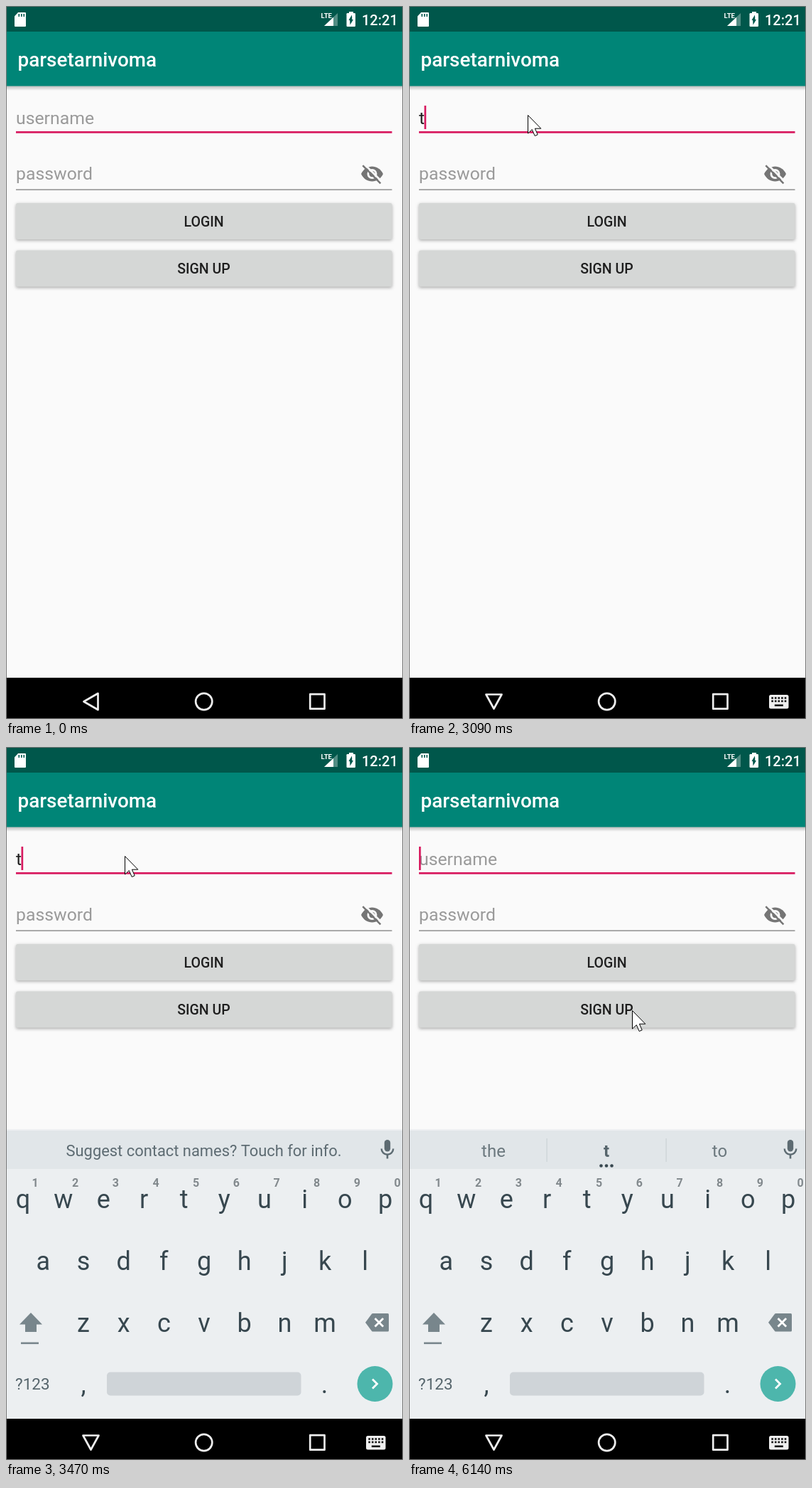
These frames come from a looping animation (559x1002 px, 8 s). An HTML page with a canvas:

```html
<!DOCTYPE html>
<html lang="en">
<head>
<meta charset="utf-8">
<title>Login screen</title>
<style>
  html, body { margin: 0; width: 100%; height: 100%; overflow: hidden; background: #fafafa; }
  canvas { display: block; }
</style>
</head>
<body>
<canvas id="stage" width="559" height="1002"></canvas>
<script>
const W = 559, H = 1002, LOOP = 8000, STEP = 90;
const TYPE = 3090, SLIDE = 3270, ERASE = 3790;
const ctx = document.getElementById('stage').getContext('2d');
const INK = '#37474f', SOFT = '#78868c', GREY = '#757575';

const within = (t, a, b) => t >= a && t < b;
const smooth = u => u * u * (3 - 2 * u);

// Progress from a to b, advancing once per screen capture
function progress(t, a, b) {
  if (t >= b) return 1;
  return Math.max(0, Math.floor((t - a) / STEP) * STEP / (b - a));
}

function box(x, y, w, h, color, r = 0) {
  ctx.fillStyle = color;
  ctx.beginPath();
  ctx.roundRect(x, y, w, h, r);
  ctx.fill();
}

function frame(x, y, w, h, color, width) {
  ctx.strokeStyle = color;
  ctx.lineWidth = width;
  ctx.strokeRect(x, y, w, h);
}

function disc(x, y, r, color) {
  ctx.fillStyle = color;
  ctx.beginPath();
  ctx.arc(x, y, r, 0, Math.PI * 2);
  ctx.fill();
}

function ring(x, y, r, color, width, end = Math.PI * 2) {
  ctx.strokeStyle = color;
  ctx.lineWidth = width;
  ctx.beginPath();
  ctx.arc(x, y, r, 0, end);
  ctx.stroke();
}

function path(points, closed) {
  ctx.beginPath();
  points.forEach(p => ctx.lineTo(...p));
  if (closed) ctx.closePath();
}

function poly(points, color) {
  path(points, true);
  ctx.fillStyle = color;
  ctx.fill();
}

function line(points, color, width, closed = false) {
  path(points, closed);
  ctx.strokeStyle = color;
  ctx.lineWidth = width;
  ctx.stroke();
}

// Isosceles triangle: apex at the origin side, opening along +x before turning
function wedge(x, y, depth, half, turn) {
  const c = Math.cos(turn), s = Math.sin(turn);
  return [[0, 0], [depth, half], [depth, -half]].map(([u, v]) => [x + u * c - v * s, y + u * s + v * c]);
}

function label(str, x, y, size, color, weight = 400, align = 'center') {
  ctx.font = `${weight} ${size}px Roboto, sans-serif`;
  ctx.textAlign = align;
  ctx.fillStyle = color;
  ctx.fillText(str, x, y);
}

function statusBar() {
  const bg = '#00574b';
  box(0, 0, W, 36, bg);

  box(12, 9, 16, 20, '#fff', 1);
  poly([[11, 8], [18, 8], [11, 15.5]], bg);
  for (let i = 0; i < 3; i++) box(17.5 + i * 3.5, 11, 1.6, 4, bg);

  const signal = size => poly([[448, 28], [448 + size, 28], [448 + size, 28 - size * .95]], '#fff');
  ctx.globalAlpha = .32;
  signal(19);
  ctx.globalAlpha = 1;
  signal(13);
  label('LTE', 443.5, 17, 9.5, '#fff', 700, 'left');

  box(483, 8, 6, 4, '#fff');
  box(479.5, 10, 12.5, 19, '#fff', 1.3);
  poly(wedge(487, 12.5, 8, 2.5, Math.PI * .58), bg);
  poly(wedge(484.5, 26.5, 8, 2.5, -Math.PI * .42), bg);
  label('12:21', 501, 26.5, 20, '#fff', 500, 'left');
}

function toolbar() {
  const shade = ctx.createLinearGradient(0, 112, 0, 119);
  shade.addColorStop(0, 'rgba(0,0,0,.26)');
  shade.addColorStop(1, 'rgba(0,0,0,0)');
  box(0, 112, W, 7, shade);
  box(0, 36, W, 76.5, '#008577');
  label('parsetarnivoma', 16.5, 84.5, 27.9, '#fff', 500, 'left');
}

function hiddenEye(x, y) {
  ctx.save();
  ctx.translate(x, y);
  ctx.fillStyle = GREY;
  ctx.beginPath();
  ctx.moveTo(-15.5, 0);
  ctx.bezierCurveTo(-9, -14, 9, -14, 15.5, 0);
  ctx.bezierCurveTo(9, 14, -9, 14, -15.5, 0);
  ctx.fill();
  ring(0, 0, 5.6, '#fafafa', 2.8);
  line([[-11, -13.8], [14.4, 11.6]], '#fafafa', 2.8);
  line([[-13.2, -11.8], [11.9, 13.3]], GREY, 2.5);
  ctx.restore();
}

function button(str, y, pressed) {
  ctx.save();
  ctx.shadowColor = 'rgba(0,0,0,.32)';
  ctx.shadowBlur = pressed ? 8 : 4;
  ctx.shadowOffsetY = pressed ? 3 : 1.6;
  box(14, y, 529.5, 51, pressed ? '#c8c9c9' : '#d5d7d6', 2.7);
  ctx.restore();
  label(str, 278.5, y + 32.9, 19.5, '#1e1e1e', 500);
}

// The caret blinks, and stays lit around the click and typing
function caretOn(t) {
  if (t < 280) return false;
  if (t < 2130) return Math.floor((t - 280) / 507) % 2 === 0;
  return t < 4190 || Math.floor((t - 4190) / 650) % 2 === 1;
}

function form(t) {
  const typed = within(t, TYPE, ERASE);
  label(typed ? 't' : 'username', 14, 165.8, 24.8, typed ? '#212121' : '#9a9a9a', 400, 'left');
  box(14, 176, 529.5, 2.8, '#d81b60');
  if (caretOn(t)) box(typed ? 21.5 : 14, 140, 2.7, 33, '#d81b60');

  label('password', 14, 244, 24.8, '#9a9a9a', 400, 'left');
  box(14, 257.5, 529.5, 1.3, '#7b7b7b');
  hiddenEye(515.5, 236);

  button('LOGIN', 277, false);
  button('SIGN UP', 343.5, within(t, 5510, 6140));
}

function microphone() {
  const color = '#5d6b72';
  box(532.8, 552, 8.4, 16.5, color, 4.2);
  ring(537, 564.5, 8.3, color, 2.4, Math.PI);
  box(535.7, 572, 2.6, 6.5, color);
}

function suggestions(t) {
  box(1, 539, 557, 54, '#e1e6e9');
  if (t < ERASE) {
    label('Suggest contact names? Touch for info.', 278.5, 575, 21.9, '#5d6b72');
  } else {
    label('the', 119, 575.5, 24, '#6b787e');
    label('t', 278, 575.5, 24, '#56656c', 700);
    label('to', 437.5, 575.5, 24, '#6b787e');
    for (let i = -1; i <= 1; i++) disc(278 + i * 7.5, 588.5, 2.3, INK);
    for (const x of [194, 362]) box(x - .5, 550, 1.2, 33, '#cbd2d6');
  }
  microphone();
}

function cross(x, y, r) {
  for (const s of [-r, r]) line([[x - r, y - s], [x + r, y + s]], '#fff', 2.8);
}

function keys(settled) {
  const pitch = 56.67;
  ['qwertyuiop', 'asdfghjkl', 'zxcvbnm'].forEach((row, r) => {
    const left = 279 - (row.length - 1) * pitch / 2;
    [...row].forEach((c, i) => label(c, left + i * pitch, 648 + r * 87, 36, INK));
  });
  for (let i = 0; i < 10; i++) label((i + 1) % 10, 41 + i * pitch, 617.5, 16, '#82898d', 700);

  poly(wedge(35, 795, 16.5, 16, Math.PI / 2), SOFT);
  box(27, 811, 16, 11, SOFT);
  box(21, 836.5, 25, 2.6, SOFT);

  poly(wedge(506, 808.8, 9.5, 12.8, 0), SOFT);
  box(515, 796, 24, 25.6, SOFT, 1.5);
  cross(525.3, 808.8, 5.8);

  label('?123', 13, 903, 22.5, '#56656c', 400, 'left');
  if (settled) {
    label(',', 109, 908, 36, INK);
    label('.', 448.5, 908, 36, INK);
  }
  box(142, 878.5, 273.5, 33, '#cfd4d8', 5);
  disc(519.5, 895, 25, '#4db6ac');
  line([[516, 888.5], [522.5, 895], [516, 901.5]], '#fff', 2.8);
}

function keyboard(t) {
  if (t < SLIDE) return;
  const p = progress(t + STEP, SLIDE, SLIDE + 3 * STEP);
  ctx.save();
  ctx.globalAlpha = p;
  ctx.translate(0, 88 * (1 - p ** 3));
  box(1, 537, 557, 2, '#eef0f2');
  box(1, 593, 557, H - 593, '#eceff1');
  suggestions(t);
  keys(p === 1);
  ctx.restore();
}

function navBar(t) {
  const color = '#efefef';
  const sliding = within(t, SLIDE, SLIDE + 2 * STEP);
  const open = t >= 2720;
  box(0, 944, W, 58, sliding ? 'rgba(0,0,0,.41)' : '#000');
  ctx.lineJoin = 'round';
  line(open ? wedge(119.5, 987.5, 20, 11, -Math.PI / 2) : wedge(109.5, 977.5, 20, 11.5, 0), color, 2.7, true);
  ring(278.7, 977.5, 11.6, color, 2.7);
  frame(428.2, 967.2, 20.3, 20.5, color, 2.7);
  ctx.lineJoin = 'miter';
  if (!open) return;
  box(507, 968, 27.5, 19.5, color, 2.5);
  for (let i = 0; i < 10; i++)
    box(510.3 + i % 5 * 4.6, 971.2 + Math.floor(i / 5) * 4.4, 2.6, 2.6, '#111');
  box(514.8, 981.5, 12, 2.6, '#111');
}

// Eased glides between the places where the pointer rests
function pointerAt(t) {
  let x = 540, y = 531;
  const glide = (a, b, toX, toY) => {
    const u = smooth(progress(t, a, b));
    x += (toX - x) * u;
    y += (toY - y) * u;
  };
  glide(750, 1380, 171, 171);
  glide(1380, 1550, 162, 141);
  glide(1950, 1950, 167, 153);
  glide(4190, 4980, 314, 370);
  return [x, y];
}

function pointer(t) {
  if (t < 750) return;
  ctx.save();
  ctx.translate(...pointerAt(t));
  const shape = [[.5, .5], [.5, 26], [6.3, 20.6], [10.2, 29.5], [14.2, 27.8], [10.4, 19.2], [18.8, 19.2]];
  poly(shape, '#fff');
  line(shape, '#000', 1, true);
  ctx.restore();
}

function draw(t) {
  box(0, 0, W, H, '#fafafa');
  toolbar();
  statusBar();
  form(t);
  keyboard(t);
  navBar(t);
  frame(.5, .5, W - 1, H - 1, '#777', 1);
  pointer(t);
}

function tick() {
  draw(performance.now() % LOOP);
  requestAnimationFrame(tick);
}
tick();
</script>
</body>
</html>
```
